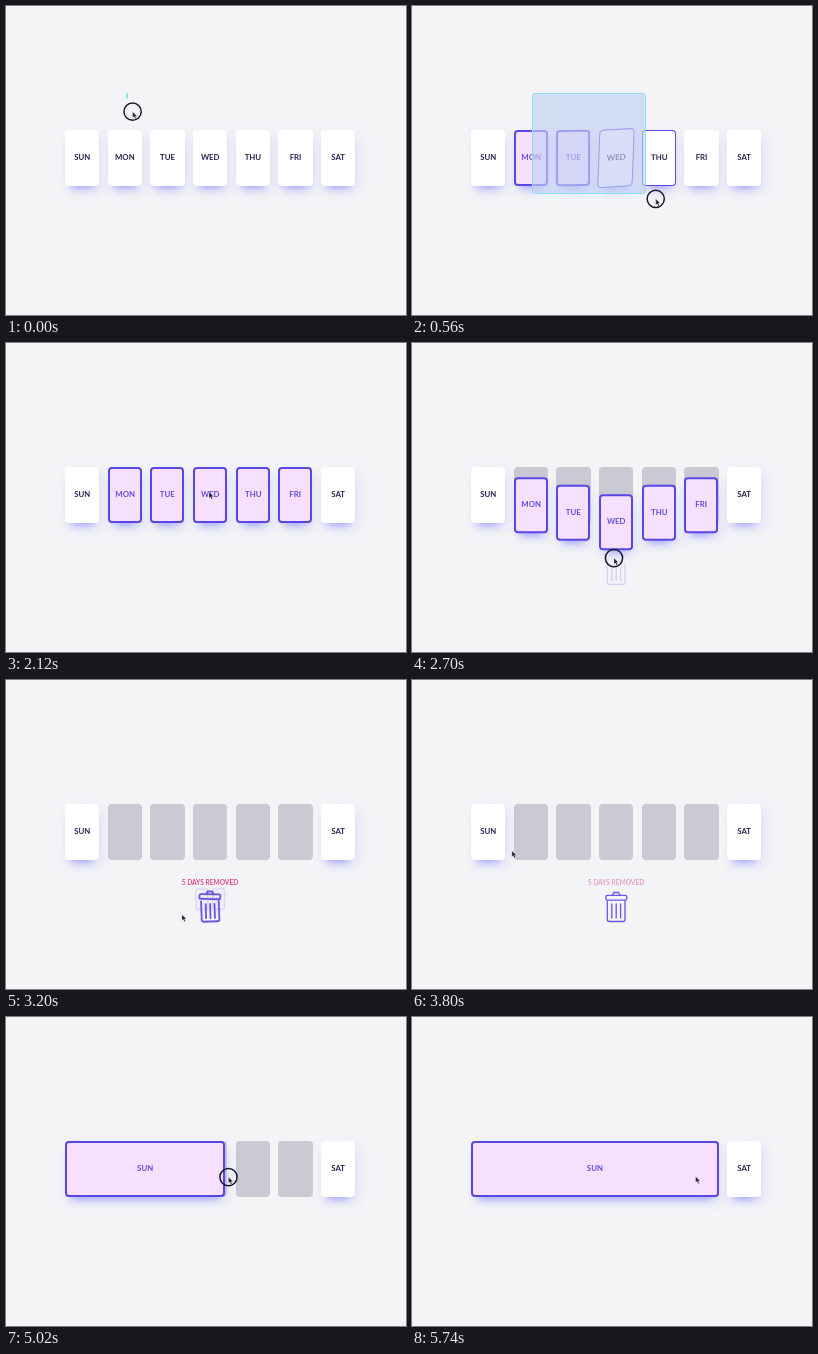
An HTML page for the animation above (5.76 s loop, 400 by 309 pixels).

```html
<!DOCTYPE html>
<html lang="en">
<head>
<meta charset="utf-8">
<title>Week cards</title>
<style>
  html, body { margin: 0; width: 100%; height: 100%; overflow: hidden; background: #f3f4f6; }
  #stage { position: relative; width: 400px; height: 309px; overflow: hidden; font: 700 7.8px Lato, sans-serif; }
  #stage > * { position: absolute; }
  .slot, .card { top: 124px; width: 34.4px; height: 55.6px; border-radius: 4px; box-sizing: border-box; }
  .slot { background: #cacad4; }
  .card {
    display: flex; align-items: center; justify-content: center; padding-bottom: 1px;
    border: 0 solid #5a46e2; background: #fff; color: #2a2452;
    box-shadow: 0 8px 8px -6px rgba(105, 100, 255, .55), 4px 5px 12px rgba(160, 165, 255, .2);
  }
  #area { left: 120px; top: 87px; box-sizing: border-box; border: 1px solid #8ee2f2; border-radius: 3px; background: rgba(195, 207, 245, .65); }
  #label { left: 144px; width: 120px; top: 197.5px; text-align: center; font-size: 6.6px; line-height: 8px; color: #df4a86; }
  svg { left: 0; top: 0; }
</style>
</head>
<body>
<div id="stage">
  <div id="area"></div>
  <div id="label">5 DAYS REMOVED</div>
  <svg width="400" height="309" fill="none">
    <g id="bin" stroke="#6a55e6" stroke-linejoin="round" stroke-linecap="round">
      <path d="M195.3 221V239.5q0 2 2 2H211q2 0 2-2V221M199.8 224V238M204.2 224V238M208.6 224V238"/>
      <g id="lid">
        <rect x="193.8" y="215.3" width="21" height="4.8" rx="1.6"/>
        <path d="M200.5 215.3l1.2-2.8h5l1.2 2.8"/>
      </g>
    </g>
    <g id="pointer">
      <circle id="ring" r="8.6" stroke="#17172e" stroke-width="1.5"/>
      <path d="M0 0V6L1.4 4.9 2.5 7.2 3.6 6.7 2.6 4.5H4.5Z" fill="#22222e" stroke="#fff" stroke-width=".3"/>
    </g>
  </svg>
</div>
<script>
const LOOP = 5760, PITCH = 42.67, LEFT = 59, TOP = 124;
const $ = id => document.getElementById(id);
const clamp = v => Math.min(1, Math.max(0, v));
const mix = (a, b, p) => a + (b - a) * p;
const ramp = (t, from, to) => clamp((t - from) / (to - from));
const smooth = p => p * p * (3 - 2 * p);
const pulse = (t, a, b, c, d) => ramp(t, a, b) * (1 - ramp(t, c, d));
const blend = (a, b, p) => `rgb(${a.map((v, i) => mix(v, b[i], p))})`;

// Monotone cubic through [time, value, ...] keys
function track(keys, t, c) {
  const last = keys.length - 1;
  if (t <= keys[0][0]) return keys[0][c];
  if (t >= keys[last][0]) return keys[last][c];
  const slope = i => (keys[i + 1][c] - keys[i][c]) / (keys[i + 1][0] - keys[i][0]);
  const tangent = i => {
    if (i === 0 || i === last) return 0;
    const a = slope(i - 1), b = slope(i);
    return a * b > 0 ? 2 * a * b / (a + b) : 0;
  };
  const i = keys.findIndex(k => k[0] > t) - 1;
  const h = keys[i + 1][0] - keys[i][0], u = (t - keys[i][0]) / h;
  return mix(keys[i][c], keys[i + 1][c], smooth(u))
    + h * u * (1 - u) * ((1 - u) * tangent(i) - u * tangent(i + 1));
}

const path = [
  [-110, 120, 87], [0, 126.5, 105.5], [580, 246, 194], [1120, 286.3, 211.5], [1450, 291, 227],
  [1700, 286, 222], [2080, 203, 149], [2260, 203, 149], [2700, 202, 215], [2900, 203, 228],
  [3000, 200, 243], [3200, 176, 234.5], [3500, 150, 212], [4020, 78, 153], [4160, 78, 153],
  [4420, 102, 154], [4520, 102, 154], [5230, 264, 163], [5480, 275, 165], [5700, 275, 165],
  [5740, 283.5, 159.5], [5760, 285, 158.5]
];
const edge = [[4500, 93.4], [4660, 112], [5230, 273], [5560, 306.8]];
const selectAt = [4080, 180, 230, 380, 560, 960, Infinity];

const add = (type, i, text) => {
  const el = document.createElement('div');
  el.className = type;
  el.textContent = text;
  el.style.left = LEFT + i * PITCH + 'px';
  $('stage').insertBefore(el, $('area'));
  return el;
};
const slots = [1, 2, 3, 4, 5].map(i => add('slot', i, ''));
const cards = ['SUN', 'MON', 'TUE', 'WED', 'THU', 'FRI', 'SAT'].map((day, i) => add('card', i, day));

function drawCard(el, i, t) {
  const p = ramp(t, selectAt[i], selectAt[i] + 340);
  const tilt = Math.sin(Math.PI * p), tone = ramp(p, .5, 1);
  let dx = 0, dy = 0, scale = 1 + .04 * tilt, alpha = 1;
  if (i > 0 && i < 6) {
    const rank = Math.abs(i - 3);
    const fall = Math.max(0, t - 2289 - 80 * rank);
    const sink = smooth(ramp(t, 2900 + 30 * rank, 3200 + 30 * rank));
    dx = (3 - i) * PITCH * sink;
    dy = mix(Math.min(67, 1.6e-4 * fall * fall), 67, sink);
    scale *= mix(1, .3, sink);
    alpha = 1 - sink ** 3;
  }
  Object.assign(el.style, {
    opacity: alpha,
    borderWidth: 2.2 * p + 'px',
    background: blend([255, 255, 255], [246, 223, 255], tone),
    color: blend([42, 36, 82], [98, 78, 218], tone),
    transform: `translate(${dx}px,${dy}px) scale(${scale}) skew(${-2.2 * tilt}deg,${-3.4 * tilt}deg)`
  });
}

function draw(t) {
  cards.forEach((el, i) => drawCard(el, i, t));
  cards[0].style.width = track(edge, t, 1) - LEFT + 'px';
  slots.forEach(el => el.style.visibility = t > 2260 ? 'visible' : 'hidden');

  const lag = Math.min(t, 1450) - 60;
  $('area').style.width = track(path, lag, 1) - 120 + 'px';
  $('area').style.height = track(path, lag, 2) - 87 + 'px';
  $('area').style.opacity = 1 - ramp(t, 1460, 1640);

  $('label').style.opacity = pulse(t, 3060, 3160, 3700, 3900);

  const shake = pulse(t, 2920, 3050, 3250, 3550);
  const swing = shake * Math.cos((t - 3200) / 45);
  $('bin').style.opacity = pulse(t, 2630, 2960, 4480, 4660);
  $('bin').setAttribute('stroke-width', 1.3 + .5 * shake);
  $('bin').setAttribute('transform', `rotate(${-2 * swing} 204 228)`);
  $('lid').style.opacity = ramp(t, 2700, 2960);
  $('lid').setAttribute('transform', `translate(0 ${-shake}) rotate(${3 * swing} 204 218)`);

  $('pointer').setAttribute('transform', `translate(${track(path, t, 1)} ${track(path, t, 2)})`);
  const ring = 1 - ramp(t, 1440, 1520) + pulse(t, 2250, 2330, 2960, 3040)
    + pulse(t, 4040, 4100, 4140, 4200) + pulse(t, 4340, 4420, 5400, 5480);
  $('ring').style.opacity = ring;
  $('ring').setAttribute('transform', `scale(${mix(.6, 1, ring)})`);
}

function frame() {
  draw(performance.now() % LOOP);
  requestAnimationFrame(frame);
}
frame();
</script>
</body>
</html>
```
